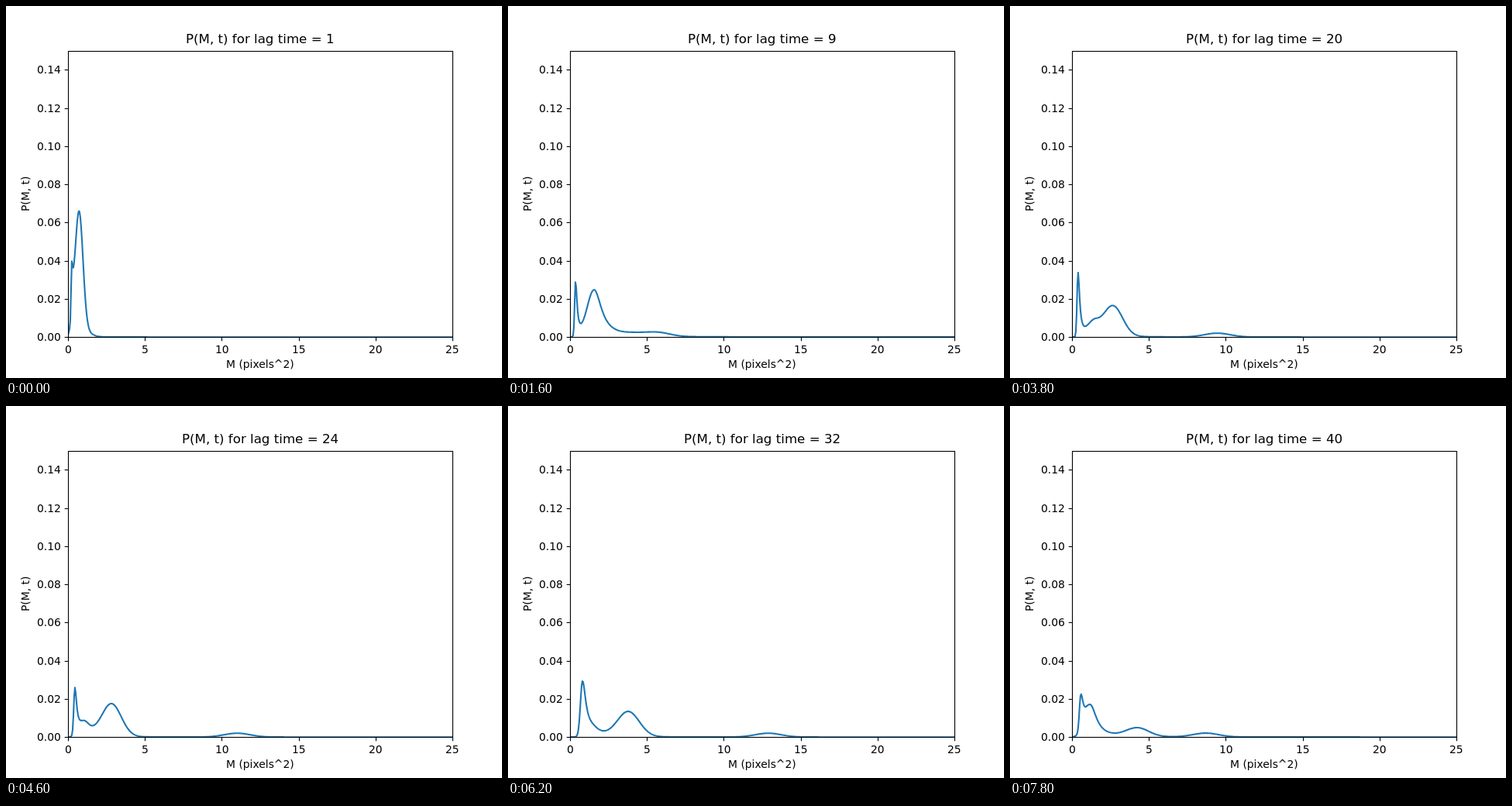
An HTML page for the animation above (8 s loop, 640 by 480 pixels).

```html
<!DOCTYPE html>
<html lang="en">
<head>
<meta charset="utf-8">
<title>P(M, t)</title>
<style>
  html, body { margin: 0; width: 100%; height: 100%; overflow: hidden; background: #fff; }
  svg { display: block; width: 640px; height: 480px; }
  text { font: 13.889px "DejaVu Sans", sans-serif; fill: #000; }
  #title { font-size: 16.667px; }
  .axis { fill: none; stroke: #000; stroke-width: 1.11; }
  #curve { fill: none; stroke: #1f77b4; stroke-width: 2.083; stroke-linejoin: round; }
</style>
</head>
<body>
<svg viewBox="0 0 640 480">
  <clipPath id="plot"><rect x="80" y="58" width="496" height="369.5"/></clipPath>
  <path id="curve" clip-path="url(#plot)"/>
  <g id="axes"><rect class="axis" x="80.5" y="58.5" width="496" height="369"/></g>
  <text id="title" y="48"></text>
  <text id="xname" y="467">M (pixels^2)</text>
  <text id="yname" transform="translate(30 0) rotate(-90)">P(M, t)</text>
</svg>
<script>
const STEP = 200, STEPS = 40;
const $ = id => document.getElementById(id);
const px = m => 80 + m * 19.84;
const py = p => 427.2 - p * 2464;
const snap = v => Math.floor(v + 0.5) + 0.5;

// Key steps: [step, near, height, skewed, height, even, height, far]
const keys = [
  [0, .24, .024, .35, .006, .72, .0635, 1.2],
  [8, .36, .0285, 1.57, .0245, 4.2, .001, 5.7],
  [14, .65, .0355, 1, .003, 2.97, .016, 10.4],
  [19, .39, .0335, 1.4, .007, 2.68, .0153, 9.45],
  [27, .5, .0155, .75, .007, 2.98, .0187, 12.55],
  [34, 1.04, .038, 2, .0003, 4.4, .0088, 13.15],
  [39, .57, .0185, 1.2, .0155, 4.25, .0045, 8.7]
];

const gauss = x => Math.exp(-x * x / 2);
const lorentz = x => 1 / (1 + x * x);
// Peaks broaden with M and level off.
const spread = c => .84 * (1 - Math.exp(-c / 2));
// Steep rise on the left, long tail on the right.
const skew = (d, left, right) => d < 0 ? gauss(d / left) : lorentz(d / right);

function keyAt(step) {
  const i = Math.max(1, keys.findIndex(k => k[0] >= step));
  const a = keys[i - 1], b = keys[i];
  const k = (step - a[0]) / (b[0] - a[0]);
  return a.map((v, j) => v + (b[j] - v) * k);
}

function density(m, [, near, nearH, mid, midH, even, evenH, far]) {
  return nearH * skew(m - near, near * .16, near * .33)
    + midH * skew(m - mid, spread(mid), spread(mid) * 1.3)
    + evenH * gauss((m - even) / spread(even))
    + .002 * gauss((m - far) / spread(far));
}

function curvePath(step) {
  const key = keyAt(step);
  let d = "";
  for (let i = 0; i <= 500; i++) {
    const m = i / 20;
    d += (i ? "L" : "M") + px(m).toFixed(2) + " " + py(density(m, key)).toFixed(2);
  }
  return d;
}

// Text starts on a whole pixel.
function center(el, at) {
  el.setAttribute("x", Math.round(at - el.getComputedTextLength() / 2));
}

function drawAxes() {
  const tick = (d, x, y, label) => {
    $("axes").insertAdjacentHTML("beforeend",
      `<path class="axis" d="${d}"/><text x="${x}" y="${y}">${label}</text>`);
    return $("axes").lastElementChild;
  };
  for (let m = 0; m <= 25; m += 5) {
    center(tick(`M${snap(px(m))} 427.5v4.86`, 0, 448, m), px(m));
  }
  for (let i = 0; i <= 7; i++) {
    const y = py(i * .02);
    tick(`M80.5 ${snap(y)}h-4.86`, 40, Math.round(y + 5), (i * .02).toFixed(2));
  }
  center($("xname"), 328);
  center($("yname"), -242.4);
}

let shown = -1;
function update(ms) {
  const step = Math.floor(ms / STEP) % STEPS;
  if (step === shown) return;
  shown = step;
  $("title").textContent = `P(M, t) for lag time = ${step + 1}`;
  center($("title"), 328);
  $("curve").setAttribute("d", curvePath(step));
}

drawAxes();
const start = performance.now();
function tick() {
  update(performance.now() - start);
  requestAnimationFrame(tick);
}
tick();
</script>
</body>
</html>
```
